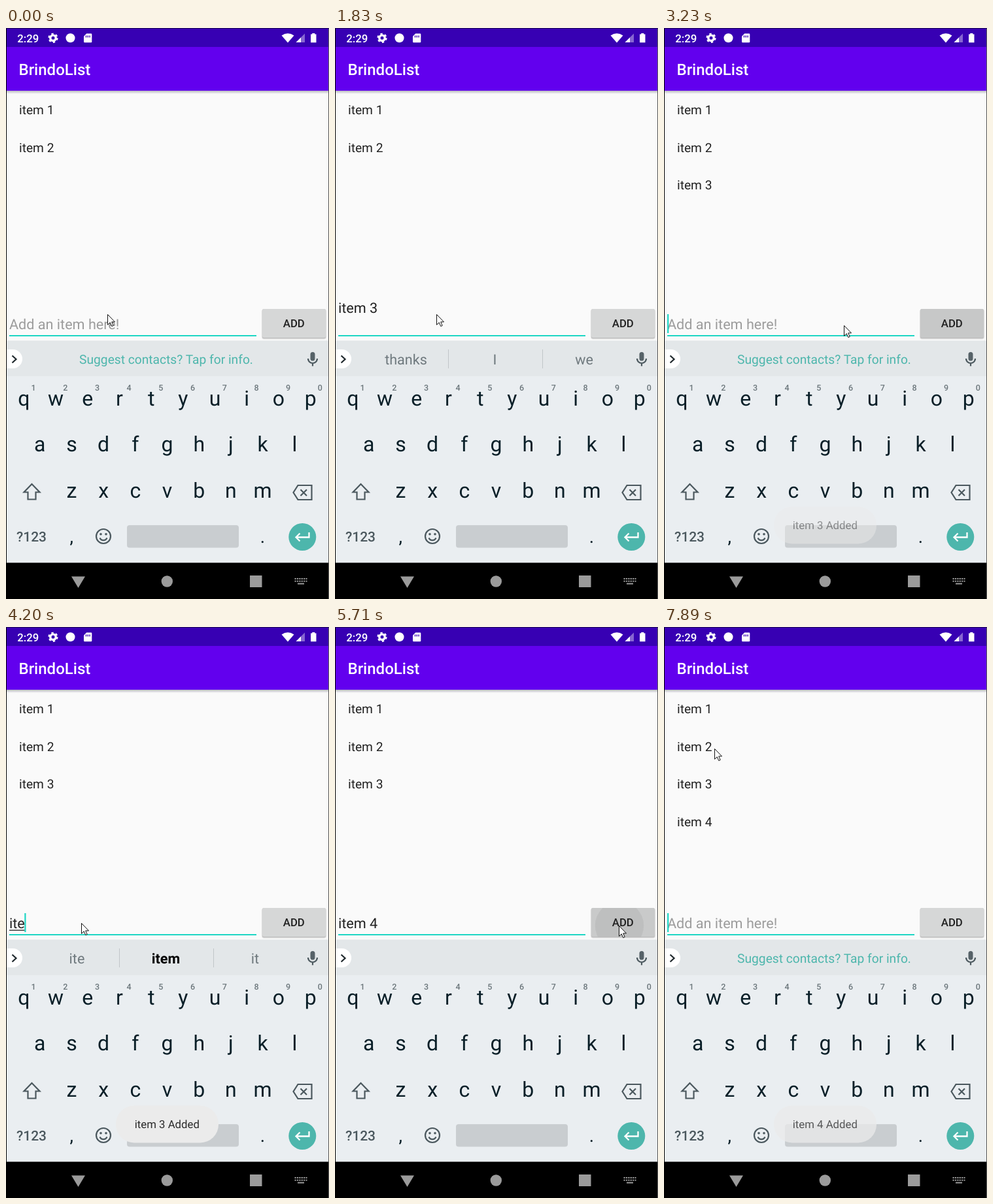
Animation of 494 by 874 pixels, one loop 8000 ms. Source, as an HTML page:

```html
<!DOCTYPE html>
<html lang="en">
<head>
<meta charset="utf-8">
<title>To-do list</title>
<style>
  html, body { margin: 0; width: 100%; height: 100%; overflow: hidden; background: #000; }
  svg { display: block; width: 494px; height: 874px; font-family: Roboto, sans-serif; }
  text { white-space: pre; text-rendering: geometricPrecision; }
  .mid { text-anchor: middle; }
  .item { font-size: 19.2px; fill: #212121; }
  .field { font-size: 21.6px; fill: #212121; }
  .sug { font-size: 21.6px; fill: #6f797e; text-anchor: middle; }
  .key { font-size: 32px; fill: #0a1f28; text-anchor: middle; }
  .num { font-size: 12.5px; font-weight: 500; fill: #6b767b; text-anchor: middle; }
  .line { fill: none; stroke: #4b585e; stroke-width: 2.2; }
</style>
</head>
<body>
<svg viewBox="0 0 494 874">
  <defs>
    <linearGradient id="drop" x2="0" y2="1">
      <stop stop-color="#b9b9c0"/><stop offset="1" stop-color="#fafafa"/>
    </linearGradient>
    <clipPath id="btnClip"><rect x="392" y="430" width="97" height="44" rx="2.5"/></clipPath>
  </defs>

  <rect width="494" height="874" fill="#fafafa"/>
  <rect width="494" height="30" fill="#3700b3"/>
  <rect y="29" width="494" height="67" fill="#6200ee"/>
  <rect y="96" width="494" height="5" fill="url(#drop)"/>

  <!-- status bar -->
  <g fill="#fff">
    <text x="17.3" y="21.5" font-size="16.8" font-weight="500">2:29</text>
    <circle cx="72" cy="15.3" r="4.2" fill="none" stroke="#fff" stroke-width="3.4"/>
    <circle cx="72" cy="15.3" r="6.4" fill="none" stroke="#fff" stroke-width="2.4" stroke-dasharray="3.2 3.5"/>
    <circle cx="98.5" cy="15.3" r="7"/>
    <path d="M123.2 8.5H130a1.3 1.3 0 0 1 1.3 1.3V21a1.3 1.3 0 0 1-1.3 1.3H120.3A1.3 1.3 0 0 1 119 21V12.7Z"/>
    <path d="M122.5 11.5v3M125.3 11.5v3M128.1 11.5v3" stroke="#3700b3" stroke-width="1.4"/>
    <path d="M421.5 11.6Q431 4.8 440.5 11.6L431 22.4Z"/>
    <path d="M457 8.5V22H443.5Z" opacity=".4"/>
    <path d="M451 14.5V22H443.5Z"/>
    <path d="M468.3 8h4v1.6h2.2v12.7h-8.4V9.6h2.2Z"/>
  </g>
  <text x="19.5" y="72" font-size="24" font-weight="500" fill="#fff">BrindoList</text>

  <g id="items"></g>

  <!-- input row -->
  <text id="field" class="field" x="5"></text>
  <rect id="under" x="5" y="463.5" height="1.4" fill="#333"/>
  <rect x="5" y="470" width="378" height="2" fill="#1ed6c4"/>
  <rect id="caret" width="2.2" height="29" fill="#1ed6c4"/>
  <rect x="391.3" y="430.5" width="98.4" height="46" rx="3" opacity=".1"/>
  <rect x="391.7" y="430" width="97.6" height="45.2" rx="3" opacity=".17"/>
  <g clip-path="url(#btnClip)">
    <rect x="392" y="430" width="97" height="44" fill="#d6d7d7"/>
    <rect id="shade" x="392" y="430" width="97" height="44"/>
    <circle id="ripple" cx="435" cy="457" opacity=".055"/>
  </g>
  <text class="mid" x="440.3" y="458.3" font-size="16.8" font-weight="500" fill="#212121">ADD</text>

  <!-- suggestion strip -->
  <rect y="478.5" width="494" height="55" fill="#e3e7e9"/>
  <path d="M1 492H10.5a14.5 14.5 0 0 1 0 29H1Z" fill="#fff"/>
  <path d="M9.5 501.5 15.5 507 9.5 512.5" fill="none" stroke="#20292d" stroke-width="2.2"/>
  <text id="prompt" class="mid" x="245" y="514" font-size="19.2" fill="#4db6ac">Suggest contacts? Tap for info.</text>
  <g id="sugs">
    <path d="M173.5 492V521M317.5 492V521" stroke="#c1c6c9"/>
    <text class="sug" x="108.5" y="515"></text>
    <text class="sug" x="244.5" y="515"></text>
    <text class="sug" x="381" y="515"></text>
  </g>
  <rect x="465.5" y="496" width="7" height="13.5" rx="3.5" fill="#566268"/>
  <path class="line" d="M462 506a7 7 0 0 0 14 0M469 513v4.5" stroke-width="2"/>

  <!-- keyboard -->
  <rect y="533" width="494" height="285.5" fill="#eaeef1"/>
  <g id="keys"></g>
  <path class="line" d="M39.5 698 27.5 710.5H33.5V721.5H45.5V710.5H51.5Z"/>
  <path class="line" d="M446.5 700H467.5V722H446.5L439.5 711ZM450.5 706.5l9.5 9.5M460 706.5l-9.5 9.5"/>
  <text class="mid" x="39" y="785.5" font-size="21" font-weight="500" fill="#4b585e">?123</text>
  <g class="mid" font-size="28" fill="#0a1f28">
    <text x="100.3" y="787.5">,</text>
    <text x="392.5" y="787.5">.</text>
  </g>
  <circle class="line" cx="149" cy="778" r="11"/>
  <path class="line" d="M143.5 780.5a6 6 0 0 0 11 0"/>
  <g fill="#4b585e"><circle cx="145" cy="774.7" r="1.8"/><circle cx="153" cy="774.7" r="1.8"/></g>
  <rect x="185" y="761" width="171" height="34.5" rx="4" fill="#c9cdd0"/>
  <circle cx="453.3" cy="779" r="21" fill="#4db6ac"/>
  <path d="M463.5 772V779.5H444M449.5 773.5l-6 6 6 6" fill="none" stroke="#fff" stroke-width="2.3"/>

  <g id="toast">
    <rect x="168" y="732.5" width="157" height="57" rx="28" fill="#ebebeb"/>
    <text class="mid" x="246.3" y="767" font-size="16.8" fill="#2b2b2b"></text>
  </g>

  <!-- navigation bar -->
  <rect y="818.5" width="494" height="56"/>
  <g fill="#9b9b9b">
    <path d="M100 839.5H121L110.5 857Z"/>
    <circle cx="246.3" cy="847" r="8.7"/>
    <rect x="373" y="838" width="18.5" height="18"/>
  </g>
  <path d="M441.5 843h19M441.5 846.7h19" stroke="#9b9b9b" stroke-width="2" stroke-dasharray="2.2 1.2"/>
  <path d="M446 850.6h10" stroke="#9b9b9b" stroke-width="2"/>

  <rect width="1" height="874"/>
  <rect x="493" width="1" height="874" fill="#555"/>
  <rect width="494" height="1" fill="#1b0a55"/>

  <path id="mouse" d="M.5 .5V16.3L4.2 12.8 6.8 18.6 9.2 17.5 6.7 11.9H11.5Z" fill="#fff" stroke="#111" stroke-width="1"/>
</svg>
<script>
const LOOP = 8000, TICK = 135, BLINK = 470;
const $ = id => document.getElementById(id);
const clamp = v => Math.min(1, Math.max(0, v));
const ease = u => u * u * (3 - 2 * u);

// Each round types "item n" and presses ADD; the item lands on release.
const rounds = [
  { n: 3, type: 430, done: 1130, press: 2815 },
  { n: 4, type: 4050, done: 4900, press: 5565 }
];
rounds.forEach(r => r.add = r.press + 275);

// A stray line break, removed again later.
const wrap = { from: 1280, to: 2110 };
const edits = [wrap.from, wrap.to, ...rounds.flatMap(r => [r.type, r.done, r.add])];

const stages = ['i', 'ite', 'item '];
const words = {
  'i': ['I', 'in', 'it'],
  'ite': ['ite', 'item', 'it'],
  'item ': ['number', 'and', 'is'],
  '\n': ['thanks', 'I', 'we']
};

const moves = [
  { from: 2540, to: 2810, x: 434, y: 457 },
  { from: 2950, to: 3620, x: 115, y: 453 },
  { from: 5170, to: 5570, x: 434, y: 457 },
  { from: 6290, to: 6410, x: 427, y: 498 },
  { from: 6720, to: 7890, x: 77, y: 186 }
];

function typedAt(t) {
  const r = rounds.find(r => t >= r.type && t < r.add);
  if (!r) return '';
  if (t >= r.done) return 'item ' + r.n;
  return stages[Math.min(2, Math.floor((t - r.type) / TICK))];
}

// The pointer travels in even hops, as a screen recorder catches it.
function pointerAt(t) {
  let x = 155, y = 438;
  for (const m of moves) {
    if (t < m.from) break;
    const span = m.to - m.from;
    const hops = Math.round(span / TICK);
    const hop = Math.floor((t - m.from) / span * hops + 1e-6);
    const u = ease(clamp((hop + 1) / (hops + 1)));
    x += (m.x - x) * u;
    y += (m.y - y) * u;
  }
  return [Math.round(x), Math.round(y)];
}

function set(el, attrs) {
  for (const k in attrs) el.setAttribute(k, attrs[k]);
}

function label(parent, cls, x, y, str) {
  const el = document.createElementNS('http://www.w3.org/2000/svg', 'text');
  set(el, { class: cls, x, y });
  el.textContent = str;
  parent.append(el);
  return el;
}

const rows = [1, 2, 3, 4].map(n => label($('items'), 'item', 20, 75 + 57.4 * n, 'item ' + n));

['qwertyuiop', 'asdfghjkl', 'zxcvbnm'].forEach((row, r) => {
  [...row].forEach((c, i) => {
    const x = 246.5 + 48.7 * (i - (row.length - 1) / 2);
    label($('keys'), 'key', x, 578 + 70.4 * r, c);
    if (r === 0) label($('keys'), 'num', x + 14.7, 555, (i + 1) % 10);
  });
});

const sugs = [...$('sugs').querySelectorAll('text')];
const toastText = $('toast').querySelector('text');

function drawField(t) {
  const text = typedAt(t);
  const wrapped = t >= wrap.from && t < wrap.to;
  const composing = text === 'i' || text === 'ite';

  const field = $('field');
  field.textContent = text.trimEnd() || 'Add an item here!';
  field.style.fill = text ? '' : '#9c9c9c';
  set(field, { y: wrapped ? 436.3 : 461.3 });

  const trail = text.endsWith(' ') ? 5.4 : 0;
  const width = text ? field.getComputedTextLength() + trail : 0;
  set($('under'), { width: composing ? width : 0 });

  const idle = t - Math.max(...edits.filter(e => e <= t));
  set($('caret'), {
    x: wrapped ? 5 : 5 + Math.max(0, width - .5),
    y: wrapped ? 440 : 438,
    opacity: Math.floor(idle / BLINK) % 2 === 0 ? 1 : 0
  });

  const list = wrapped ? t - wrap.from >= 2 * TICK && words['\n'] : words[text];
  set($('prompt'), { opacity: text ? 0 : 1 });
  set($('sugs'), { opacity: list ? 1 : 0 });
  sugs.forEach((el, i) => {
    const strong = composing && i === 1;
    el.textContent = list ? list[i] : '';
    el.style.fontWeight = strong ? 700 : 400;
    el.style.fill = strong ? '#000' : '';
  });
}

function drawButton(t) {
  const r = rounds.findLast(r => t >= r.press);
  const held = r && t < r.add;
  const shade = !r ? 0 : held ? .06 : .12 * clamp(1 - (t - r.add) / 350);
  set($('shade'), { opacity: shade });
  set($('ripple'), { r: held ? (t - r.press) * .255 : 0 });
}

function drawAdded(t) {
  rounds.forEach(r => set(rows[r.n - 1], { opacity: t >= r.add ? 1 : 0 }));
  const r = rounds.findLast(r => t >= r.add);
  const age = r ? t - r.add : 0;
  toastText.textContent = r ? `item ${r.n} Added` : '';
  set($('toast'), { opacity: clamp(Math.min(age / 300, (2350 - age) / 400)) });
}

function draw(t) {
  drawField(t);
  drawButton(t);
  drawAdded(t);
  set($('mouse'), { transform: `translate(${pointerAt(t)})` });
}

function tick() {
  draw(performance.now() % LOOP);
  requestAnimationFrame(tick);
}
tick();
</script>
</body>
</html>
```
